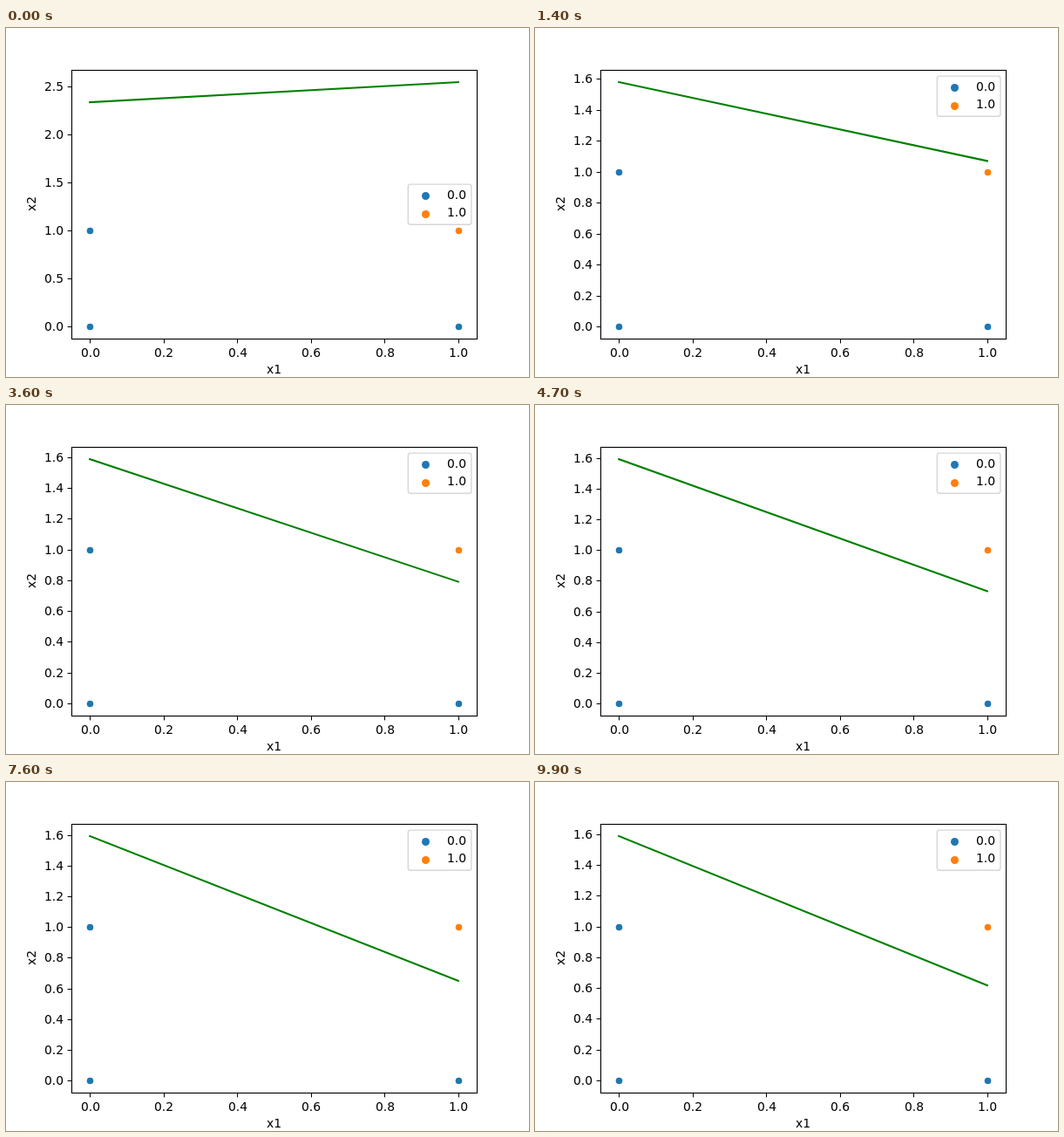
These frames come from a looping animation (600x400 px, 10 s). An HTML page with a canvas:

```html
<!DOCTYPE html>
<html>
<head>
<meta charset="utf-8">
<style>
html, body { margin: 0; width: 100%; height: 100%; overflow: hidden; background: #fff; }
canvas { display: block; }
</style>
</head>
<body>
<canvas id="plot" width="600" height="400"></canvas>
<script>
const ctx = document.getElementById('plot').getContext('2d');
const BLUE = '#1f77b4', ORANGE = '#ff7f0e';
const LEFT = 75, RIGHT = 540, TOP = 48, BOTTOM = 356;
const X0 = 96.14, XSPAN = 422.72, Y0 = 342, YSPAN = 280;

// Line height at x1 = 0: a fast drop, a shallow dip, then a slow drift
const startHeight = t =>
  1.6215 - 0.0033 * t - 0.129 * Math.exp(-0.5 * t) + 0.8415 * Math.exp(-2.48 * t);
// The slope settles towards -1
const slope = t => Math.exp(0.19 - 0.708 * t ** 0.7225) - 1;

const px = v => X0 + XSPAN * v;
const snap = v => Math.round(v) + 0.5;

function stroke(color, width, ...points) {
  ctx.strokeStyle = color;
  ctx.lineWidth = width;
  ctx.beginPath();
  points.forEach(p => ctx.lineTo(...p));
  ctx.stroke();
}

// anchor: 0 left, 0.5 centre, 1 right; glyphs start on whole pixels
function text(s, x, y, anchor) {
  ctx.fillStyle = '#000';
  ctx.fillText(s, Math.ceil(x - anchor * ctx.measureText(s).width), Math.round(y));
}

function dot(x, y, r, color) {
  ctx.fillStyle = color;
  ctx.beginPath();
  ctx.arc(snap(x), snap(y), r, 0, 7);
  ctx.fill();
}

// First free spot: upper right, centre right, lower centre
function legendSpot(a, b, py) {
  const edge = (461 - X0) / XSPAN;
  if (py(a + (b - a) * edge) > 101.5 && py(b) > 101.5) return [461, 55];
  const y = py(1);
  return y < 179 || y > 225.5 ? [461, 179] : [271, 303];
}

function legend(x, y) {
  ctx.beginPath();
  ctx.roundRect(x + 0.3, y + 0.1, 72.6, 46.2, 2.8);
  ctx.fillStyle = 'rgba(255,255,255,0.8)';
  ctx.fill();
  ctx.strokeStyle = 'rgba(204,204,204,0.8)';
  ctx.lineWidth = 1.39;
  ctx.stroke();
  [['0.0', BLUE], ['1.0', ORANGE]].forEach(([label, color], i) => {
    dot(x + 20, y + 13 + i * 21, 4.5, color);
    text(label, x + 44.5, y + 17 + i * 20, 0);
  });
}

function draw(t) {
  const a = startHeight(t), b = a + slope(t);
  const max = Math.max(a, b);
  const py = v => Y0 - YSPAN * v / max;
  const step = [0.2, 0.25, 0.5].find(s => s >= 1.1 * max / 9);
  const digits = step === 0.25 ? 2 : 1;

  ctx.fillStyle = '#fff';
  ctx.fillRect(0, 0, 600, 400);
  ctx.font = '13.89px "DejaVu Sans", sans-serif';

  for (const x of [0, 1])
    for (const y of [0, 1]) dot(px(x), py(y), 3.8, x && y ? ORANGE : BLUE);

  ctx.lineCap = 'butt';
  for (let i = 0; i <= 5; i++) {
    const x = px(i / 5);
    stroke('#000', 1, [snap(x), BOTTOM], [snap(x), BOTTOM + 5.4]);
    text((i / 5).toFixed(1), x, 377, 0.5);
  }
  for (let v = 0; v <= 1.05 * max; v += step) {
    const y = py(v);
    stroke('#000', 1, [LEFT - 4.4, snap(y)], [LEFT, snap(y)]);
    text(v.toFixed(digits), LEFT - 9.7, y + 5, 1);
  }
  text('x1', 307.5, 396, 0.5);
  ctx.save();
  ctx.translate(digits === 2 ? 25 : 34, 202);
  ctx.rotate(-Math.PI / 2);
  text('x2', 0, 0, 0.5);
  ctx.restore();

  ctx.lineCap = 'square';
  stroke('#008000', 2.08, [px(0), py(a)], [px(1), py(b)]);
  ctx.strokeStyle = '#000';
  ctx.lineWidth = 1.11;
  ctx.strokeRect(LEFT + 0.5, TOP + 0.5, RIGHT - LEFT, BOTTOM - TOP);
  legend(...legendSpot(a, b, py));
}

function tick() {
  draw(Math.floor(performance.now() % 10000 / 100) / 10);
  requestAnimationFrame(tick);
}
tick();
</script>
</body>
</html>
```
